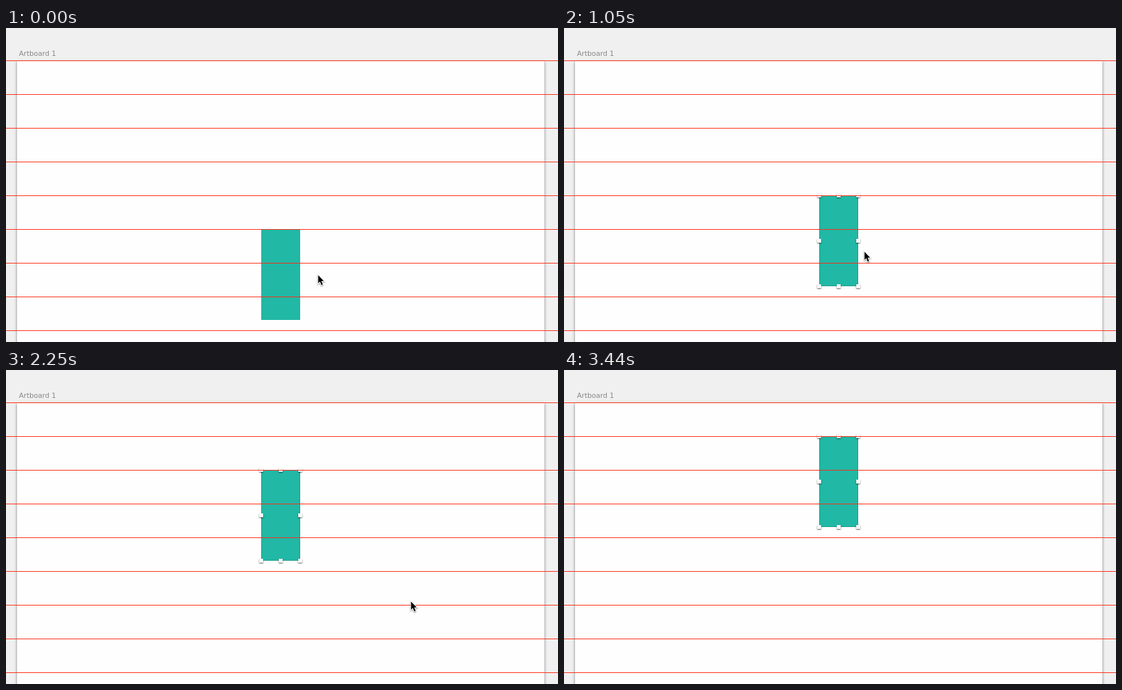
These frames come from a looping animation (850x484 px, 3890 ms). An HTML page with a canvas:

```html
<!DOCTYPE html>
<html lang="en">
<head>
<meta charset="utf-8">
<title>Nudging a bar along guides</title>
<style>
  html, body { margin: 0; width: 100%; height: 100%; overflow: hidden; background: #f0f0f0; }
  canvas { display: block; }
</style>
</head>
<body>
<canvas width="850" height="484"></canvas>
<script>
const ctx = document.querySelector('canvas').getContext('2d');
const LOOP = 3890, GRID = 52;
const bar = { x: 393, y: 310, w: 60, h: 140 };
const HOVER = 300, SELECT = 450;
const nudges = [1050, 1650, 2250, 2840];
// time, left, top
const pointerPath = [
  [0, 479, 381], [150, 442, 354], [300, 429, 345], [1050, 461, 345],
  [1200, 576, 353], [1350, 622, 357], [2990, 659, 371],
  [3140, 762, 419], [3290, 816, 465], [3440, 850, 484]
];
const arrow = new Path2D('M1.7 0V12.4L4.5 9.8L6.7 15.2L8.8 14.3L6.6 9.1H10.4Z');

function rect(color, x, y, w, h) {
  ctx.fillStyle = color;
  ctx.fillRect(x, y, w, h);
}

function withShadow(color, blur, dy, draw) {
  ctx.save();
  ctx.shadowColor = color;
  ctx.shadowBlur = blur;
  ctx.shadowOffsetY = dy;
  draw();
  ctx.restore();
}

function drawArtboard() {
  rect('#f0f0f0', 0, 0, 850, 484);
  withShadow('rgba(0,0,0,.5)', 4, 1, () => rect('#fefefe', 17, 51, 812, 460));
  ctx.fillStyle = '#868686';
  ctx.font = '10.7px "DejaVu Sans", sans-serif';
  ctx.fillText('Artboard 1', 20, 43);
}

function drawHandles(y) {
  ctx.strokeStyle = 'rgba(0,0,0,.15)';
  ctx.lineWidth = 1;
  ctx.strokeRect(bar.x + .5, y + .5, bar.w - 1, bar.h - 1);
  for (let row = 0; row < 3; row++) {
    for (let col = 0; col < 3; col++) {
      if (row === 1 && col === 1) continue;
      const hx = bar.x + col * bar.w / 2 - 3, hy = y + row * bar.h / 2 - 3;
      withShadow('rgba(0,0,0,.65)', 2, 1, () => rect('#fafafa', hx, hy, 6, 6));
    }
  }
}

function drawBar(t) {
  const y = bar.y - GRID * nudges.filter(n => t >= n).length;
  rect('#21b8a5', bar.x, y, bar.w, bar.h);
  if (t >= SELECT) {
    drawHandles(y);
  } else if (t >= HOVER) {
    ctx.strokeStyle = '#4a9de8';
    ctx.lineWidth = 2;
    ctx.strokeRect(bar.x, y, bar.w, bar.h);
  }
}

function drawGuides() {
  for (let y = 50; y < 484; y += GRID) rect('#ff2a12', 0, y, 850, 1);
}

function drawPointer(t) {
  const [, x, y] = pointerPath.filter(p => t >= p[0]).pop();
  if (x >= 850) return;
  ctx.save();
  ctx.translate(x, y);
  ctx.strokeStyle = '#fff';
  ctx.lineWidth = 2;
  withShadow('rgba(0,0,0,.45)', 2, 1, () => ctx.stroke(arrow));
  ctx.fillStyle = '#000';
  ctx.fill(arrow);
  ctx.restore();
}

function frame(now) {
  const t = now % LOOP;
  drawArtboard();
  drawBar(t);
  drawGuides();
  drawPointer(t);
}

const start = performance.now();
function tick() {
  frame(performance.now() - start);
  requestAnimationFrame(tick);
}
tick();
</script>
</body>
</html>
```
